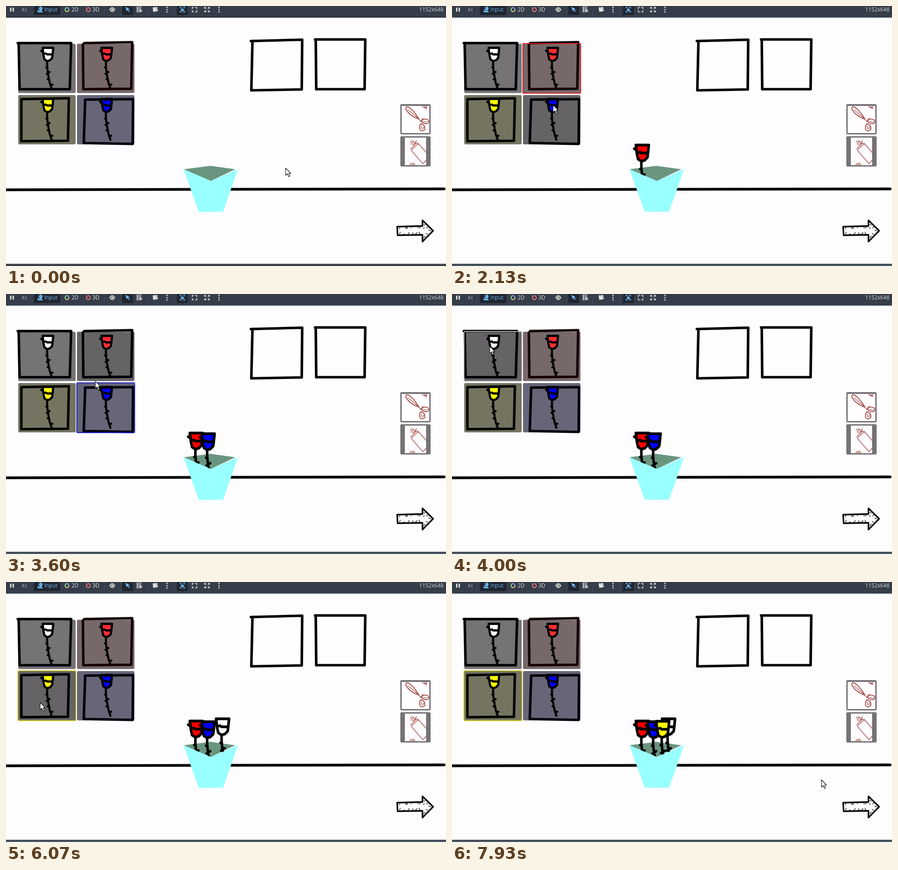
These frames come from a looping animation (973x575 px, 8 s). An HTML page with a canvas:

```html
<!DOCTYPE html>
<html lang="en">
<head>
<meta charset="utf-8">
<title>Flower shop</title>
<style>
html, body { margin: 0; width: 100%; height: 100%; overflow: hidden; background: #fffdff; }
canvas { display: block; width: 973px; height: 575px; }
</style>
</head>
<body>
<canvas id="stage" width="973" height="575"></canvas>
<script>
const c = document.getElementById('stage').getContext('2d');
const LOOP = 8000, TICK = 1000 / 15;
const FONT = '11.9px "Open Sans", "Noto Sans", sans-serif';
const ACCENT = '#70bafa', LIGHT = '#e0e0e0', DARK = '#20262f';

// Pointer stops: time, x, y
const STOPS = [
  [0, 618, 358], [133, 618, 358], [533, 215, 150], [733, 215, 150], [933, 438, 380],
  [1267, 420, 362], [1333, 420, 362], [1467, 440, 366], [1533, 440, 366],
  [1867, 225, 170], [2333, 222, 250], [2533, 222, 250], [2733, 444, 354],
  [2800, 456, 361], [2933, 456, 361], [3133, 446, 362], [3267, 446, 362],
  [3800, 83, 115], [4000, 83, 115], [4333, 482, 366], [4533, 478, 349],
  [4667, 478, 349], [4733, 478, 357], [5067, 478, 357], [5867, 124, 287],
  [5933, 75, 266], [6067, 75, 266], [6467, 552, 378], [6867, 492, 361],
  [6933, 487, 362], [7000, 487, 362], [7200, 465, 362], [7467, 465, 362], [7933, 816.5, 437]
];

const SLOTS = [
  { x: 27, y: 83.6, bud: 90, bg: '#757375', ink: '#000', petal: '#fff', ring: '#cfcdcf', click: 4000,
    frame: 'M26 82H144L141 184H30L28 83' },
  { x: 157, y: 83.6, bud: 90, bg: '#776869', ink: '#140406', petal: '#ff2d33', ring: '#e81818', click: 733,
    frame: 'M173 82L279 80L277 183L171 184L170 85' },
  { x: 27, y: 197, bud: 203, bg: '#747461', ink: '#050500', petal: '#ff0', ring: '#c8c310', click: 6067,
    frame: 'M34 206L139 204L137 298L34 299Z' },
  { x: 157, y: 197, bud: 203, bg: '#666678', ink: '#00000c', petal: '#00f', ring: '#0a0ac8', click: 2533,
    frame: 'M175 207L281 206L280 305L172 303Z' }
];
const SLOT_W = 127, SLOT_H = 109;

// Back to front
const BOUQUET = [
  { x: 478, y: 299.5, petal: '#fafafa', from: 4933 },
  { x: 420, y: 304.5, petal: '#f00', from: 1333 },
  { x: 446, y: 306, petal: '#00f', from: 3267 },
  { x: 465, y: 305, petal: '#ff0', from: 7467 }
];

function fill(d, color) {
  c.fillStyle = color;
  c.fill(new Path2D(d));
}

function stroke(d, color, width) {
  c.strokeStyle = color;
  c.lineWidth = width;
  c.stroke(new Path2D(d));
}

function box(x, y, w, h, color, r = 0) {
  c.fillStyle = color;
  c.beginPath();
  c.roundRect(x, y, w, h, r);
  c.fill();
}

function dot(x, y, r, color) {
  c.fillStyle = color;
  c.beginPath();
  c.arc(x, y, r, 0, 7);
  c.fill();
}

function arc(x, y, r, a, b, color, width) {
  c.strokeStyle = color;
  c.lineWidth = width;
  c.beginPath();
  c.arc(x, y, r, a, b);
  c.stroke();
}

function label(s, x, color, align = 'left') {
  c.font = FONT;
  c.textAlign = align;
  c.fillStyle = color;
  c.fillText(s, x, 12);
}

function pointerAt(t) {
  const i = STOPS.findIndex(s => s[0] > t);
  if (i < 0) return STOPS[STOPS.length - 1].slice(1);
  const [t0, x0, y0] = STOPS[i - 1], [t1, x1, y1] = STOPS[i];
  const u = (t - t0) / (t1 - t0), k = u * u * (3 - 2 * u);
  return [x0 + (x1 - x0) * k, y0 + (y1 - y0) * k];
}

function toolbar(active) {
  box(0, 0, 973, 25.5, '#363d4a');
  box(0, 24, 973, 1.5, active ? '#33485e' : '#20252e');
  for (const x of [54, 217, 252, 312, 371]) box(x, 0, 1, 20, '#444b58');
  box(62, 0, 58, 20, DARK, 2);
  box(257, 0, 24, 20, DARK, 2);
  box(378, 0, 24, 20, DARK, 2);

  box(9, 3.5, 3, 9, LIGHT, 1);
  box(14.5, 3.5, 3, 9, LIGHT, 1);
  fill('M36 3L42 8L36 13Z', '#737984');
  box(43, 3, 2, 10, '#737984');

  dot(76.5, 5.5, 4.3, ACCENT);
  box(75, 8, 3, 4, ACCENT);
  box(70, 9, 3, 5, ACCENT, 1);
  box(71, 11, 10, 3, ACCENT, 1);
  dot(75, 4.5, 1.2, DARK);
  label('Input', 84.5, ACCENT);

  arc(135, 8, 4.3, 2.2, 4.5, '#8eef97', 2);
  arc(135, 8, 4.3, 4.5, 6.6, '#8da5f3', 2);
  arc(135, 8, 4.3, 0.3, 2.2, '#f0d77a', 2);
  label('2D', 145, LIGHT);
  arc(182, 8, 4.3, 0, 7, '#fc7f7f', 2);
  label('3D', 191, LIGHT);

  stroke('M229.5 8Q235 -.5 240.5 8Q235 16.5 229.5 8Z', LIGHT, 2);
  dot(235, 8, 2.2, LIGHT);
  fill('M264 2L273 6L270 7.5L274 11.5L272.5 13L268.5 9L267 12Z', ACCENT);
  stroke('M290 2.5H299M290 6H299M290 9.5H295M290 13H295M290 2V13.5', LIGHT, 1.6);
  fill('M295 7L302 10L299 11L301 14L299 14L297.5 12L296 14Z', LIGHT);
  dot(327, 5, 2.6, LIGHT);
  dot(332, 4.5, 2.6, LIGHT);
  box(325, 6, 8, 6.5, LIGHT, 1);
  fill('M332 9L336 6.5V12Z', LIGHT);
  for (const x of [356, 471]) for (const y of [3, 8, 13]) dot(x, y, 1.6, LIGHT);

  stroke('M385 5V2.5H388M392 2.5H395V5M385 11V13.5H388M392 13.5H395V11', ACCENT, 1.5);
  box(387, 7, 6, 4.5, ACCENT, 1);
  arc(390, 7, 2, 3.14, 6.28, ACCENT, 1.2);
  stroke('M412 6V3H415M419 3H422V6M412 10V13H415M419 13H422V10', LIGHT, 1.7);
  stroke('M439 5V3H442M439 3L442 6M447 3H450V5M450 3L447 6' +
    'M439 11V13H442M439 13L442 10M447 13H450V11M450 13L447 10', LIGHT, 1.6);
  label('1152x648', 967.5, '#d0d3d8', 'right');
}

// Origin: middle of the top edge of the bud
function flower(x, y, scale, petal) {
  c.save();
  c.translate(x, y);
  c.scale(scale, scale);
  fill('M-11 2.5H12.5L10.5 24L5 30L-1 32L-7 28Z', petal);
  stroke('M-11 2.5H12.5L11 17L10 25L5 30L-1 32L-7 28L-9 19L-11 3M-14 9L-10 12M-9 16L-4 15L-1 17H10', '#000', 4.8);
  stroke('M-1 33L-1 42L0 54L2.5 69L5 81L9 93', '#000', 4.6);
  stroke('M-1 46H-3M1 56H4.5M0 60H-2M2 72H0M6 84H11', '#000', 4.6);
  c.restore();
}

function slot(s, px, py, focused) {
  const hover = px >= s.x && px < s.x + SLOT_W && py >= s.y && py < s.y + SLOT_H;
  box(s.x, s.y, SLOT_W, SLOT_H, hover ? '#656365' : s.bg, 3);
  flower(s.x + 65, s.bud, 1, s.petal);
  stroke(s.frame, hover ? '#000' : s.ink, 5.6);
  if (!focused) return;
  c.strokeStyle = s.ring;
  c.lineWidth = 1.8;
  c.beginPath();
  c.roundRect(s.x - 0.5, s.y - 0.7, SLOT_W + 1, SLOT_H + 1.2, 2);
  c.stroke();
}

function tools() {
  const ink = '#a5504b';
  box(872, 217, 67, 67, '#757375', 3);
  box(875, 221, 61, 60, '#fffdff');
  stroke('M913 250C900 246 884 234 884 225C888 218 902 231 913 250Z', ink, 2);
  stroke('M889 230C898 236 906 243 912 250M913 250L918 256M922 248L917 256', ink, 1.5);
  stroke('M919 255C922 247 934 250 935 255C934 262 924 262 919 255Z', ink, 2);
  stroke('M918 260C912 267 914 276 920 276C929 276 929 265 918 260Z', ink, 2);
  stroke('M923 256L930 256M919 266C917 271 922 273 924 268', ink, 1.5);
  stroke('M921 222L930 227M926 222L930 227V221', ink, 1.5);

  box(872, 288, 67, 67, '#757375', 3);
  box(882, 291, 47, 61, '#fffdff');
  c.save();
  c.beginPath();
  c.rect(882, 291, 47, 61);
  c.clip();
  stroke('M883 345Q890 342 897 345', '#ead9d8', 1);
  stroke('M896 319L912 304L930 325M897 320L922 349L930 340', ink, 1.4);
  stroke('M895 316L908 303L912 306M894 301Q898 296 900 301L896 306M901 298L904 304L908 297M899 308L907 302', ink, 1.4);
  stroke('M893 352Q896 347 902 348L904 352M898 350L901 352', ink, 1.5);
  c.restore();
}

function arrow() {
  const d = 'M865 488L921 486.5V474L944.5 497L921 521V506L866 507Z';
  fill(d, '#fff');
  stroke(d, '#000', 3.4);
  stroke('M871 490L870 493M882 489L886 492M888 489L886 493M898 488L896 490M910 488L912 491M917 489L914 491' +
    'M870 504L872 500M880 505V503M889 504L892 501M900 504L899 501M906 504L909 501M915 504L913 500' +
    'M924 483L927 485M925 490L923 492M933 489L930 491M939 497L935 496M924 512L927 509M932 505L929 503', '#000', 1.3);
}

function bucket(t) {
  fill('M393 361L452 353.5L507 361L453 387Z', '#6a957f');
  for (const f of BOUQUET) if (t >= f.from) flower(f.x, f.y, 1.22, f.petal);
  fill('M392.5 361L453 387L513 361L480 455H426Z', '#99ffff');
}

function pointer(x, y) {
  c.save();
  c.translate(x, y);
  const d = 'M.5 .5V16.5L4.3 13L7 19.5L9.8 18.3L7 12H11.8Z';
  fill(d, '#fff');
  stroke(d, '#15151c', 1.2);
  c.restore();
}

function draw(ms) {
  const t = Math.floor((ms + 4) / TICK) * TICK + 1;
  const [px, py] = pointerAt(t);
  const focus = SLOTS.filter(s => t >= s.click).sort((a, b) => b.click - a.click)[0];
  c.lineCap = c.lineJoin = 'round';
  box(0, 0, 973, 575, '#fffdff');
  toolbar(!!focus);
  box(0, 570, 973, 5, '#4a4c54');
  box(0, 573.5, 973, 1.5, focus ? '#3d6080' : '#282d37');

  stroke('M0 406.5L420 405.5L969 404.5', '#000', 5.8);
  stroke('M541.5 77.5L655 74.5L654 184.5L542.5 186.5L545 78', '#000', 5.7);
  stroke('M683.5 74H794.5L793 184H686L685 75', '#000', 5.7);
  for (const s of SLOTS) slot(s, px, py, s === focus);
  tools();
  bucket(t);
  arrow();
  pointer(px, py);
}

function loop() {
  draw(performance.now() % LOOP);
  requestAnimationFrame(loop);
}
loop();
</script>
</body>
</html>
```
